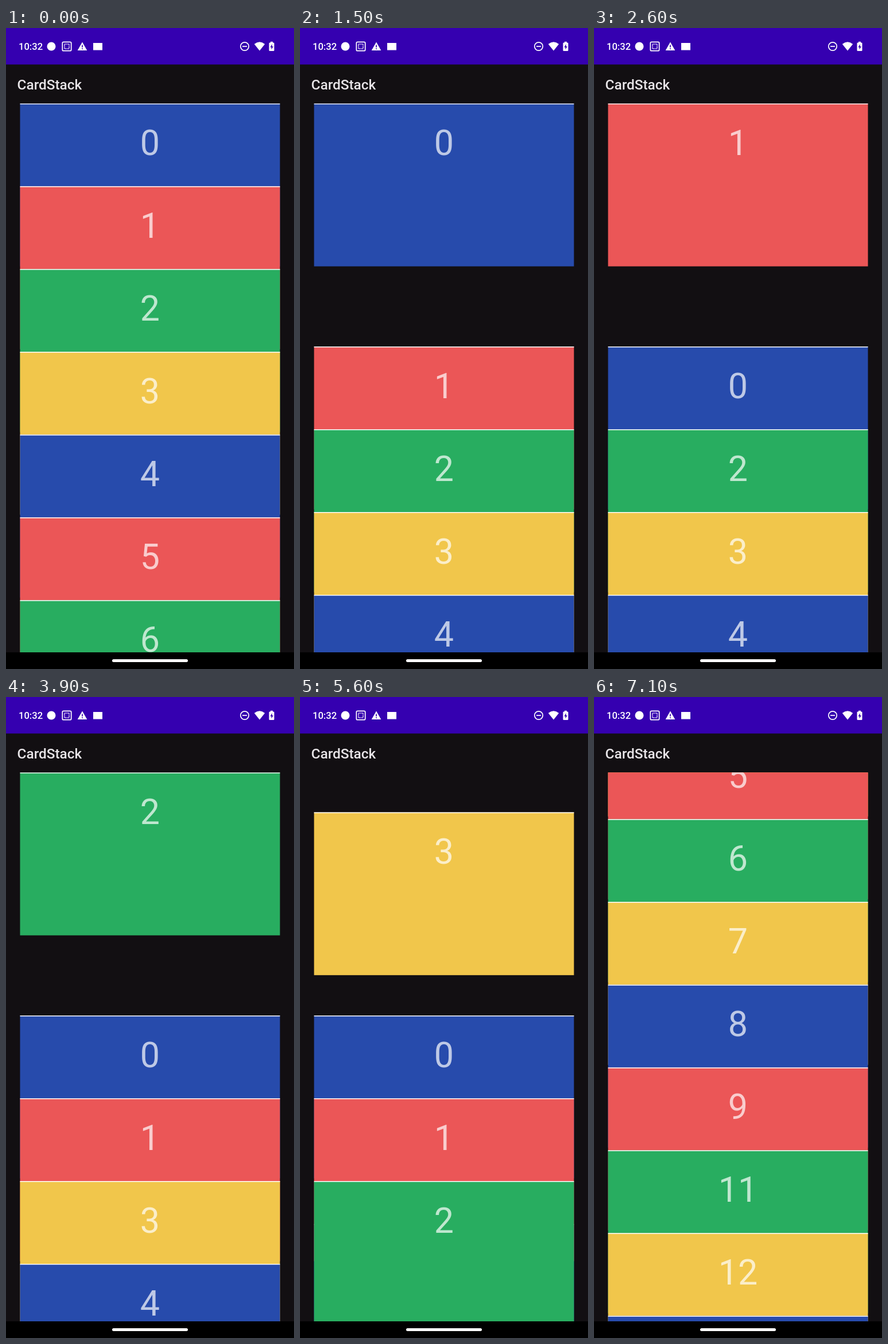
An HTML page that plays this animation: 502 px wide and 1115 px high, repeating every 8 s.

```html
<!DOCTYPE html>
<html lang="en">
<head>
<meta charset="utf-8">
<title>CardStack</title>
<style>
html, body { margin: 0; width: 502px; height: 1115px; overflow: hidden; background: #120f12; }
svg { display: block; }
text { font-family: Roboto, sans-serif; }
</style>
</head>
<body>
<svg width="502" height="1115" viewBox="0 0 502 1115">
  <clipPath id="list"><rect y="131.3" width="502" height="954.7"/></clipPath>
  <rect width="502" height="1115" fill="#120f12"/>
  <g id="cards" clip-path="url(#list)"></g>

  <rect width="502" height="63.5" fill="#3500b0"/>
  <g fill="#fff">
    <text x="22" y="38" font-size="16.6" font-weight="500">10:32</text>
    <circle cx="79" cy="32" r="7.5"/>
    <path d="M133 24.5l8.3 14.5h-16.6z"/>
    <rect x="152" y="26" width="16" height="12.5"/>
    <path d="M442 39.5l-9.2-11.6q9.2-7.4 18.4 0z"/>
    <path d="M461 25.5v-1.7h4v1.7h1.2q1.3 0 1.3 1.3v11.9q0 1.3-1.3 1.3h-6.4q-1.3 0-1.3-1.3v-11.9q0-1.3 1.3-1.3z"/>
  </g>
  <path d="M133 29.5v4.3M133 35.2v1.8" stroke="#3500b0" stroke-width="1.7"/>
  <path d="M463.8 28l-3.3 5.6h2.1v4l3.2-5.6h-2z" fill="#3500b0"/>
  <g fill="none" stroke="#fff" stroke-width="1.7">
    <rect x="98.3" y="24.3" width="15.4" height="15.4" rx="2"/>
    <rect x="102" y="28" width="8" height="8" stroke-width="1.6" stroke-dasharray="1.6 1.07"/>
    <circle cx="416" cy="32" r="7.2"/>
    <path d="M412 32h8"/>
  </g>
  <text x="19.5" y="106.7" font-size="24.4" font-weight="500" fill="#e7e4e7">CardStack</text>

  <rect y="1086" width="502" height="29"/>
  <rect x="185" y="1098" width="132" height="5" rx="2.5" fill="#fff"/>
</svg>
<script>
const LOOP = 8000, STEP = 100, MOVE = 300;
const TOP = 131.3, PITCH = 144, HEIGHT = 283.3, REST = 422.7;
const COLORS = ['#274bac', '#eb5657', '#28ad60', '#f1c64b'];

// [start time, selected card]; -1 means none
const taps = [[-MOVE, -1], [550, 0], [1500, -1], [2250, 1], [3550, 2], [4550, 3], [5551, 4]];
// [time, scroll offset]
const scroll = [[6100, 0], [6200, 65], [6300, 224.5], [6400, 420], [6500, 575], [6600, 675],
  [6700, 725], [6800, 725], [6900, 830], [7000, 975], [7100, 1061.5]];

const cards = Array.from({ length: 16 }, (_, i) => {
  const g = document.createElementNS('http://www.w3.org/2000/svg', 'g');
  const label = i < 10 ? i : i + 1; // the list has no 10
  g.innerHTML = `<rect x="24.5" width="453" height="${HEIGHT}" fill="${COLORS[i % 4]}"/>
    <rect x="24.5" width="453" height="1.5" fill="#fff"/>
    <text x="251" y="89.5" font-size="61" text-anchor="middle" fill="#fff" fill-opacity=".7">${label}</text>`;
  return document.getElementById('cards').appendChild(g);
});

function slot(i, selected) {
  if (selected < 0) return i * PITCH;
  if (i === selected) return 0;
  return REST + (i > selected ? i - 1 : i) * PITCH;
}

// cubic-bezier(.4, 0, .2, 1)
function ease(x) {
  if (x >= 1) return 1;
  let lo = 0, hi = 1, s;
  for (let k = 0; k < 24; k++) {
    s = (lo + hi) / 2;
    const bx = 1.2 * s * (1 - s) ** 2 + 0.6 * s * s * (1 - s) + s ** 3;
    if (bx < x) lo = s; else hi = s;
  }
  return s * s * (3 - 2 * s);
}

function scrollAt(t) {
  const n = scroll.findIndex(p => p[0] > t);
  if (n < 0) return scroll[scroll.length - 1][1];
  if (n === 0) return 0;
  const [t0, y0] = scroll[n - 1], [t1, y1] = scroll[n];
  return y0 + (y1 - y0) * (t - t0) / (t1 - t0);
}

function draw(t) {
  const n = taps.findLastIndex(p => p[0] <= t);
  const [start, now] = taps[n];
  const before = n ? taps[n - 1][1] : -1;
  const k = ease((t - start) / MOVE);
  const offset = TOP - scrollAt(t);

  cards.forEach((card, i) => {
    const from = slot(i, before);
    card.setAttribute('transform', `translate(0 ${offset + from + (slot(i, now) - from) * k})`);
  });

  // the selected card lies under the rest of the stack
  const parent = cards[0].parentNode;
  const order = now < 0 ? cards : [cards[now], ...cards.filter((_, i) => i !== now)];
  if (draw.top !== now) parent.append(...order);
  draw.top = now;
}

const began = performance.now();
function tick() {
  const t = (performance.now() - began) % LOOP;
  draw(Math.floor(t / STEP) * STEP);
  requestAnimationFrame(tick);
}
tick();
</script>
</body>
</html>
```
